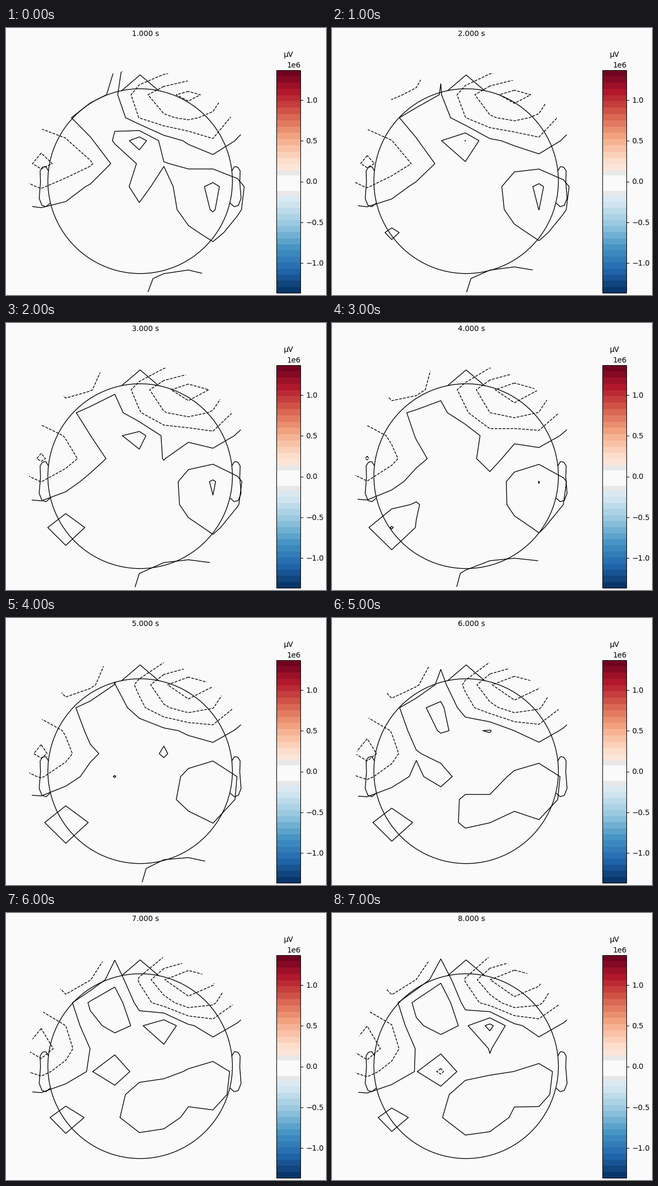
These frames come from a looping animation (600 by 500 pixels, 8 s). A matplotlib script:

```python
import numpy as np
import matplotlib.pyplot as plt
from matplotlib.animation import ArtistAnimation
from matplotlib.patches import Circle, Rectangle

BG = "#fafafa"
SECONDS = 8
CX, CY, R = 251.5, 286.8, 173
CLIP_R = 208

# The electrode lattice: contours are linear between its nodes.
STEP_X, STEP_Y = 46, 43
ORIGIN_X, ORIGIN_Y = 250, 297
COLS, ROWS = np.meshgrid(np.arange(-6, 7), np.arange(-6, 7))

BASELINE = 0.5
KEY_TIMES = (1, 4, 7.5)

# Sources of activity, in lattice steps from the centre:
# column, row, width, height, then the strength at each key time.
SOURCES = {
    "right forehead": (2.1, -3.8, 2.1, 1.3, -3.9, -4.3, -4.7),
    "mid forehead": (0, -3.3, 1, 1, -1.3, -0.5, 0),
    "left forehead": (-2.5, -4.7, 1.2, 1.2, -2.4, -3.4, -4.2),
    "left temple": (-4.1, -1.2, 1.6, 1.6, -2.8, -2.6, -3.2),
    "left front": (-1.4, -3.2, 0.9, 1.5, 1.3, 0.5, 2.4),
    "left middle": (-2, -1.2, 1, 1, -1.3, -0.4, 0),
    "front": (0, -2, 0.8, 0.8, 2.5, 0.8, 0),
    "right front": (1, -2, 0.8, 0.8, 0, -0.6, 2.3),
    "right middle": (1, -1, 0.7, 0.7, 0.4, -1, 0),
    "right temple": (3, -1.6, 0.8, 0.8, -1.6, -1.2, -0.7),
    "right ear": (2.9, 0.3, 1.1, 1.7, 1.9, 1.6, 0.8),
    "crown": (-0.2, 0.3, 0.8, 0.8, 0.9, 0, 0),
    "left crown": (-1, 0, 0.75, 0.75, 0, 0, -1.9),
    "left ear": (-2, 0.6, 0.6, 0.6, 0.6, 0.8, 0.4),
    "left back": (-3, 2, 0.9, 0.9, 0.2, 1.6, 0.9),
    "back": (0.3, 1.4, 1.4, 1.4, 0, 0, 1.3),
    "neck": (1.8, 4.6, 2.2, 1, 1, 1.6, 0),
}

fig = plt.figure(figsize=(6, 5), dpi=100, facecolor=BG)
ax = fig.add_axes([0, 0, 1, 1])
ax.set(xlim=(0, 600), ylim=(500, 0))
ax.axis("off")


def label(x, y, text, ha="center"):
    return ax.text(x, y, text, fontsize=10, family="DejaVu Sans", ha=ha, va="baseline")


def draw_head():
    ax.add_patch(Circle((CX, CY), R, fill=False, lw=1))
    nose_y = np.sqrt(1 - 0.2**2)
    ear_x = 2 * np.array([.497, .510, .518, .5299, .5419, .54, .547, .532, .510, .489])
    ear_y = 2 * np.array([.0555, .0775, .0783, .0746, .0555, -.0055, -.0932, -.1313, -.1384, -.1199])
    nose = np.array([-0.2, 0, 0.2]), np.array([nose_y, 1.15, nose_y])
    for x, y in (nose, (ear_x, ear_y), (-ear_x, ear_y)):
        ax.plot(CX + R * x, CY - R * y, color="k", lw=1)


def draw_colorbar():
    left, width, top, bottom = 507, 45, 78.5, 496

    def band(y0, y1, color):
        ax.add_patch(Rectangle((left, y0), width, y1 - y0, fc=color, lw=0, antialiased=False))

    cmap = plt.get_cmap("RdBu_r")
    for start, stop in ((top, 267), (314, bottom)):
        edges = np.linspace(start, stop, 17)
        for y0, y1 in zip(edges, edges[1:]):
            band(y0, y1, cmap((bottom - (y0 + y1) / 2) / (bottom - top)))
    band(267, 314, "#e8e8e8")
    band(276, 305, BG)
    ax.add_patch(Rectangle((left, top), width, bottom - top, fill=False, lw=0.8))
    for value in (1.0, 0.5, 0.0, -0.5, -1.0):
        y = 287.5 - 152.4 * value
        ax.plot([left + width, left + width + 5], [y, y], color="k", lw=0.8, solid_capstyle="butt")
        label(562.5, y + 5, f"{value:.1f}".replace("-", "\u2212"), "left")
    label(552.5, 74, "1e6", "right")
    label(530, 54, "\u00b5V")


def activity(t):
    field = np.full(COLS.shape, BASELINE)
    for col, row, width, height, *strengths in SOURCES.values():
        spread = ((COLS - col) / width) ** 2 + ((ROWS - row) / height) ** 2
        field += np.interp(t, KEY_TIMES, strengths) * np.exp(-spread)
    return field


def draw_second(t):
    lines = ax.contour(ORIGIN_X + STEP_X * COLS, ORIGIN_Y + STEP_Y * ROWS, activity(t),
                       levels=np.arange(-3, 3), colors="k", linewidths=1)
    lines.set_clip_path(Circle((CX, CY), CLIP_R, transform=ax.transData))
    return [lines, label(261, 15, f"{t:.3f} s")]


draw_head()
draw_colorbar()
frames = [draw_second(t) for t in range(1, SECONDS + 1)]

anim = ArtistAnimation(fig, frames, interval=1000, repeat=True, repeat_delay=0)
plt.show()
```
